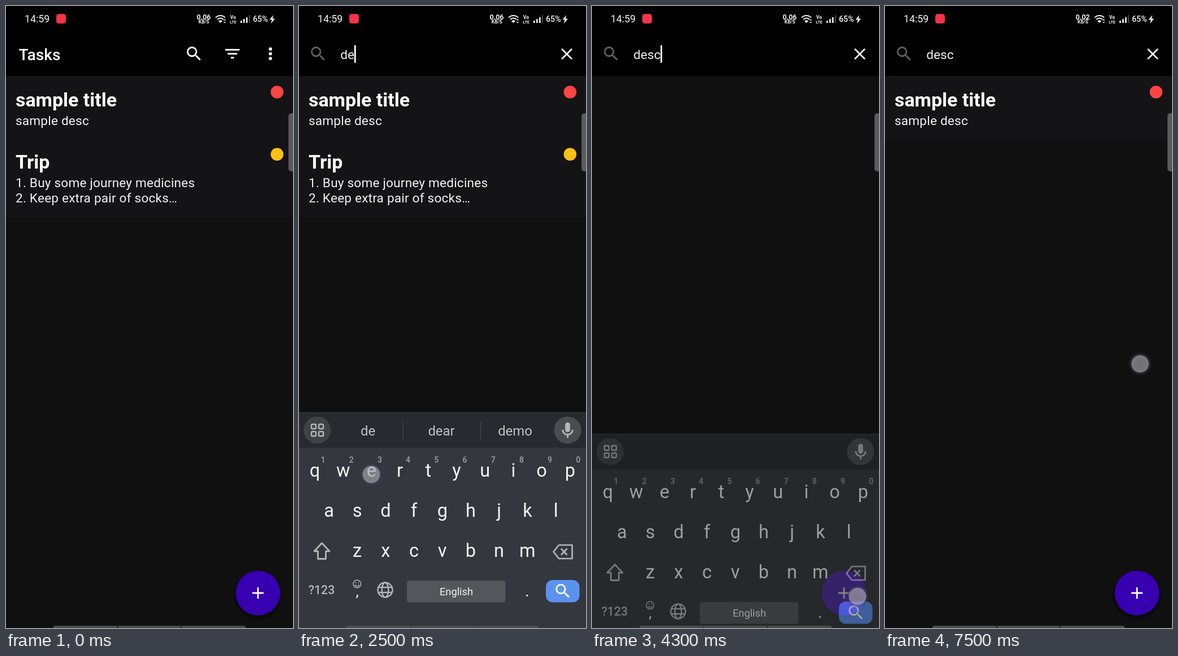
Write an HTML page that moves like this. It is 508 px wide and 1102 px high and loops after 7600 ms.

```html
<!DOCTYPE html>
<html lang="en">
<head>
<meta charset="utf-8">
<title>Task search</title>
<style>
  html, body { margin: 0; width: 100%; height: 100%; overflow: hidden; background: #111011; }
  svg { display: block; width: 100%; height: 100%; font-family: Roboto, sans-serif; }
  text { white-space: pre; }
  .title { font-size: 33.9px; font-weight: 700; fill: #fff; }
  .desc { font-size: 22.6px; letter-spacing: .2px; fill: #f2f2f2; }
  .query { font-size: 22.6px; }
  .line { fill: none; stroke: #b4b6b8; stroke-width: 2.4; }
  .soft { fill: #b4b6b8; }
  .mid { text-anchor: middle; }
</style>
</head>
<body>
<svg viewBox="0 0 508 1102">
  <defs>
    <radialGradient id="touchFill">
      <stop offset="0" stop-color="#a09ea3" stop-opacity=".66"/>
      <stop offset=".6" stop-color="#a5a3a9" stop-opacity=".7"/>
      <stop offset=".69" stop-color="#aaa8b0" stop-opacity=".72"/>
      <stop offset=".76" stop-color="#4a4968" stop-opacity=".5"/>
      <stop offset="1" stop-color="#34344e" stop-opacity="0"/>
    </radialGradient>
    <radialGradient id="shade">
      <stop offset=".84" stop-color="#000" stop-opacity=".5"/>
      <stop offset="1" stop-color="#000" stop-opacity="0"/>
    </radialGradient>
    <path id="lens" d="M15.5 14h-.79l-.28-.27A6.47 6.47 0 0 0 16 9.5 6.5 6.5 0 1 0 9.5 16c1.61 0 3.09-.59 4.23-1.57l.27.28v.79l5 4.99L20.49 19zM9.5 14a4.5 4.5 0 1 1 0-9 4.5 4.5 0 0 1 0 9z"/>
  </defs>

  <rect width="508" height="1102" fill="#111011"/>

  <g id="first">
    <rect y="124" width="508" height="113" fill="#141316"/>
    <text class="title" x="17" y="178">sample title</text>
    <text class="desc" x="17" y="211">sample desc</text>
    <circle cx="479.8" cy="152.5" r="11.3" fill="#ff4444"/>
  </g>
  <g id="second">
    <rect y="237" width="508" height="137" fill="#141316"/>
    <text class="title" x="17" y="288">Trip</text>
    <text class="desc" x="17" y="321">1. Buy some journey medicines</text>
    <text class="desc" x="17" y="348">2. Keep extra pair of socks…</text>
    <circle cx="479.8" cy="262.8" r="11.3" fill="#ffc014"/>
  </g>

  <circle cx="446" cy="1043" r="46" fill="url(#shade)"/>
  <circle cx="446" cy="1040" r="39.5" fill="#3700b0"/>
  <path d="M436 1040h20M446 1030v20" stroke="#fff" stroke-width="2.8"/>

  <rect width="508" height="124"/>
  <g fill="#f5f5f5">
    <text x="33" y="29" font-size="17.8">14:59</text>
    <rect x="89" y="14" width="17" height="17" rx="4.5" fill="#f4334a"/>
    <g class="mid" font-weight="600">
      <text id="speed" x="350" y="23.5" font-size="12.4"></text>
      <text x="350.3" y="31" font-size="8.4">KB/S</text>
      <text x="402" y="22.5" font-size="8.6" font-weight="700">Vo</text>
      <text x="402" y="30.5" font-size="7" font-weight="700">LTE</text>
    </g>
    <g fill="none" stroke="#f5f5f5" stroke-width="1.9">
      <path d="M371 20.5a12 12 0 0 1 17 0M374 23.8a7.6 7.6 0 0 1 11 0"/>
      <path d="M385.5 25.5l1.6-1.7 1.6 1.7M385.5 28l1.6 1.7 1.6-1.7" stroke-width="1.2"/>
    </g>
    <path d="M376 26.6a5 5 0 0 1 7 0l-3.500 3.600z"/>
    <path d="M415 26h2.600v4h-2.600zM420 23h2.600v7h-2.600zM425 20h2.600v10h-2.600z"/>
    <rect x="430" y="16" width="2" height="14" fill="#444"/>
    <text x="437" y="27.500" font-size="14.200" font-weight="500">65%</text>
    <path d="M473 16l-6.500 8.200h4l-1.500 7 7-8.700h-4.200z"/>
  </g>

  <g id="menu" fill="#fff">
    <text x="22.600" y="96" font-size="28.200" font-weight="500">Tasks</text>
    <use href="#lens" transform="translate(315.800 67.600) scale(1.412)"/>
    <path transform="translate(383.800 67.600) scale(1.412)" d="M10 18h4v-2h-4zM3 6v2h18V6zM6 13h12v-2H6z"/>
    <circle cx="468" cy="76.200" r="2.900"/><circle cx="468" cy="84.600" r="2.900"/><circle cx="468" cy="93.100" r="2.900"/>
  </g>
  <g id="searchBar">
    <use href="#lens" fill="#606060" transform="translate(16.800 67.600) scale(1.412)"/>
    <text id="hint" class="query" x="73.300" y="94" fill="#777">Search</text>
    <text id="query" class="query" x="73.300" y="94" fill="#f2f2f2"></text>
    <rect id="caret" y="69.500" width="2.800" height="31" fill="#fff"/>
    <path d="M465 76l18 18M483 76l-18 18" stroke="#fff" stroke-width="2.800"/>
  </g>
  <rect x="500" y="190" width="20" height="103" rx="5" fill="#5b5a5d"/>

  <g id="keyboard">
    <rect y="720" width="508" height="63" fill="#272a2f"/>
    <rect y="720" width="508" height="1.500" fill="#383c41"/>
    <rect y="782.500" width="508" height="320" fill="#34373e"/>
    <circle cx="32.300" cy="751.500" r="24" fill="#404346"/>
    <circle cx="475.500" cy="751.500" r="24" fill="#4a4c50"/>
    <g class="line" stroke-width="2">
      <rect x="22" y="741" width="8" height="8" rx="2"/><rect x="35" y="741" width="8" height="8" rx="2"/>
      <rect x="22" y="754" width="8" height="8" rx="2"/><rect x="35" y="754" width="8" height="8" rx="2"/>
    </g>
    <path class="soft" transform="translate(458.100 734.800) scale(1.450)" d="M12 14c1.660 0 3-1.340 3-3V5a3 3 0 0 0-6 0v6c0 1.660 1.340 3 3 3zm5-3a5 5 0 0 1-10 0H5c0 3.530 2.610 6.430 6 6.920V21h2v-3.080c3.390-.49 6-3.390 6-6.920z"/>

    <g id="tools">
      <path class="line" d="M97 740h18q3 0 3 3v13l-8 8H97q-3 0-3-3v-18q0-3 3-3zM118 755h-5q-4 0-4 4v5M99 752a7 7 0 0 0 11 2"/>
      <circle class="soft" cx="101.500" cy="747" r="2"/><circle class="soft" cx="110.500" cy="747" r="2"/>
      <text class="mid soft" x="179.700" y="758.500" font-size="19.500" font-weight="900" letter-spacing=".5">GIF</text>
      <circle cx="253.500" cy="751.500" r="6.500" class="line" style="stroke-width:5.500"/>
      <circle cx="253.500" cy="751.500" r="9.800" class="line" style="stroke-width:4" stroke-dasharray="5 2.697"/>
      <rect class="soft" x="315" y="739.500" width="25" height="25" rx="3"/>
      <path class="soft" transform="translate(385 735) scale(1.350)" d="M12 3a9 9 0 0 0 0 18c.83 0 1.500-.67 1.500-1.500 0-.39-.15-.74-.39-1-.23-.27-.38-.62-.38-1 0-.83.670-1.500 1.500-1.500H16a5 5 0 0 0 5-5c0-4.420-4.030-8-9-8z"/>
      <g fill="#272a2f">
        <circle cx="393.800" cy="750" r="2"/><circle cx="397.800" cy="744.800" r="2"/>
        <circle cx="404.600" cy="744.800" r="2"/><circle cx="408.600" cy="750" r="2"/>
      </g>
    </g>
    <g id="words" class="mid" font-size="23.900" fill="#c0c3c6">
      <path d="M184 736v32M321.500 736v32" stroke="#43474b" stroke-width="1.400"/>
      <text x="122" y="761"></text><text x="252" y="761"></text><text x="382.500" y="761"></text>
    </g>

    <g id="keys" class="mid"></g>
    <path class="line" d="M40.500 951.500L27 966h6.500v13.500h14V966H54z" style="stroke-width:2.800" stroke-linejoin="round"/>
    <path class="line" d="M460 955h23.500v24H460l-9.500-12zM464 961.500l10.500 11M474.500 961.500l-10.500 11" style="stroke-width:2.700" stroke-linejoin="round"/>
    <text class="mid soft" x="40" y="1042" font-size="21.200" font-weight="500">?123</text>
    <g class="line" style="stroke-width:1.500">
      <circle cx="102.800" cy="1023.800" r="6.800"/><path d="M99 1025.500q3.800 4.500 7.600 0M100.300 1020.500v2M105.300 1020.500v2"/>
    </g>
    <g class="line">
      <circle cx="152.500" cy="1034.500" r="13"/><ellipse cx="152.500" cy="1034.500" rx="5.800" ry="13"/>
      <path d="M140.500 1030h24M140.500 1039h24"/>
    </g>
    <rect x="191" y="1018" width="174.500" height="38.500" rx="4" fill="#53575b"/>
    <g class="mid" fill="#f5f5f5">
      <text x="278.500" y="1044" font-size="18.300">English</text>
      <text x="103" y="1046" font-size="26">,</text>
      <text x="404" y="1046" font-size="28">.</text>
    </g>
    <rect x="437" y="1017" width="59.500" height="39.500" rx="12" fill="#5c92ef"/>
    <use href="#lens" fill="#fff" transform="translate(450 1019.500) scale(1.412)"/>
  </g>

  <path d="M87 1098h110v4H84v-1q0-3 3-3zM198.500 1098h111v4h-111zM311 1098h110q3 0 3 3v1H311z" fill="#4d4d4f"/>
  <circle id="touch" r="21" fill="url(#touchFill)"/>
</svg>

<script>
const LOOP = 7600, TICK = 100, PITCH = 50.2;
const el = id => document.getElementById(id);
const show = (id, opacity) => el(id).setAttribute('opacity', Number(opacity));

// Keyboard letters
const label = (text, x, y, size, fill, weight = 400) =>
  `<text x="${x}" y="${y}" font-size="${size}" fill="${fill}" font-weight="${weight}">${text}</text>`;
const rows = [['qwertyuiop', 28, 833.5], ['asdfghjkl', 53, 904.5], ['zxcvbnm', 103, 975.5]];
el('keys').innerHTML = rows.map(([letters, x, y]) =>
  [...letters].map((c, i) => label(c, x + i * PITCH, y, 32.5, '#f5f5f5')).join('')).join('') +
  [...'1234567890'].map((c, i) => label(c, 42.5 + i * PITCH, 809, 14, '#a0a2a6', 500)).join('');

// Each track holds [start in ms, value]; the value stays until the next start.
const tracks = {
  searching: [[0, 0], [1300, 1]],
  caret: [[0, 0], [1300, 1], [1800, 0], [2200, 1],
    ...Array.from({ length: 9 }, (_, i) => [3500 + i * 500, i % 2])],
  query: [[0, ''], [2200, 'd'], [2500, 'de'], [2700, 'des'], [3000, 'desc']],
  strip: [[0, 'tools'], [2200, 'do did day'], [2500, 'de dear demo'], [2700, 'des design desk'],
    [3000, 'desc description describe'], [4300, '']],
  keyboard: [[0, [0, 0]], [1500, [38, .62]], [1600, [0, 1]], [4300, [38, .62]], [4400, [110, .2]], [4500, [0, 0]]],
  first: [[0, 1], [4300, 0], [4500, .5], [4600, 1]],
  second: [[0, 1], [4300, 0]],
  speed: [[0, '0.06'], [6100, '0.02']],
};

// Taps: start, end, x, y
const taps = [
  [1100, 1300, 334, 87], [2100, 2300, 156, 898], [2400, 2600, 128, 830], [2600, 2800, 104, 898],
  [2900, 3100, 191, 972], [4200, 4400, 470, 1046], [6900, 7200, 456, 651], [7400, 7600, 451.5, 634],
];

const valueAt = (name, t) => tracks[name].findLast(([start]) => start <= t)[1];

function render(t) {
  const searching = valueAt('searching', t), query = valueAt('query', t);
  show('menu', !searching);
  show('searchBar', searching);
  show('first', valueAt('first', t));
  show('second', valueAt('second', t));
  show('hint', !query);
  show('caret', valueAt('caret', t));
  el('speed').textContent = valueAt('speed', t);
  el('query').textContent = query;
  el('caret').setAttribute('x', 73.3 + (query ? el('query').getComputedTextLength() - .2 : 0));

  const [drop, opacity] = valueAt('keyboard', t), strip = valueAt('strip', t);
  show('keyboard', opacity);
  el('keyboard').setAttribute('transform', `translate(0 ${drop})`);
  show('tools', strip === 'tools');
  show('words', strip && strip !== 'tools');
  const words = strip.split(' ');
  el('words').querySelectorAll('text').forEach((node, i) => node.textContent = words[i] || '');

  const tap = taps.find(([start, end]) => t >= start && t < end);
  show('touch', !!tap);
  if (tap) el('touch').setAttribute('transform', `translate(${tap[2]} ${tap[3]})`);
}

let shown = -1;
function frame() {
  const t = Math.floor(performance.now() % LOOP / TICK) * TICK;
  if (t !== shown) render(shown = t);
  requestAnimationFrame(frame);
}
frame();
</script>
</body>
</html>
```
